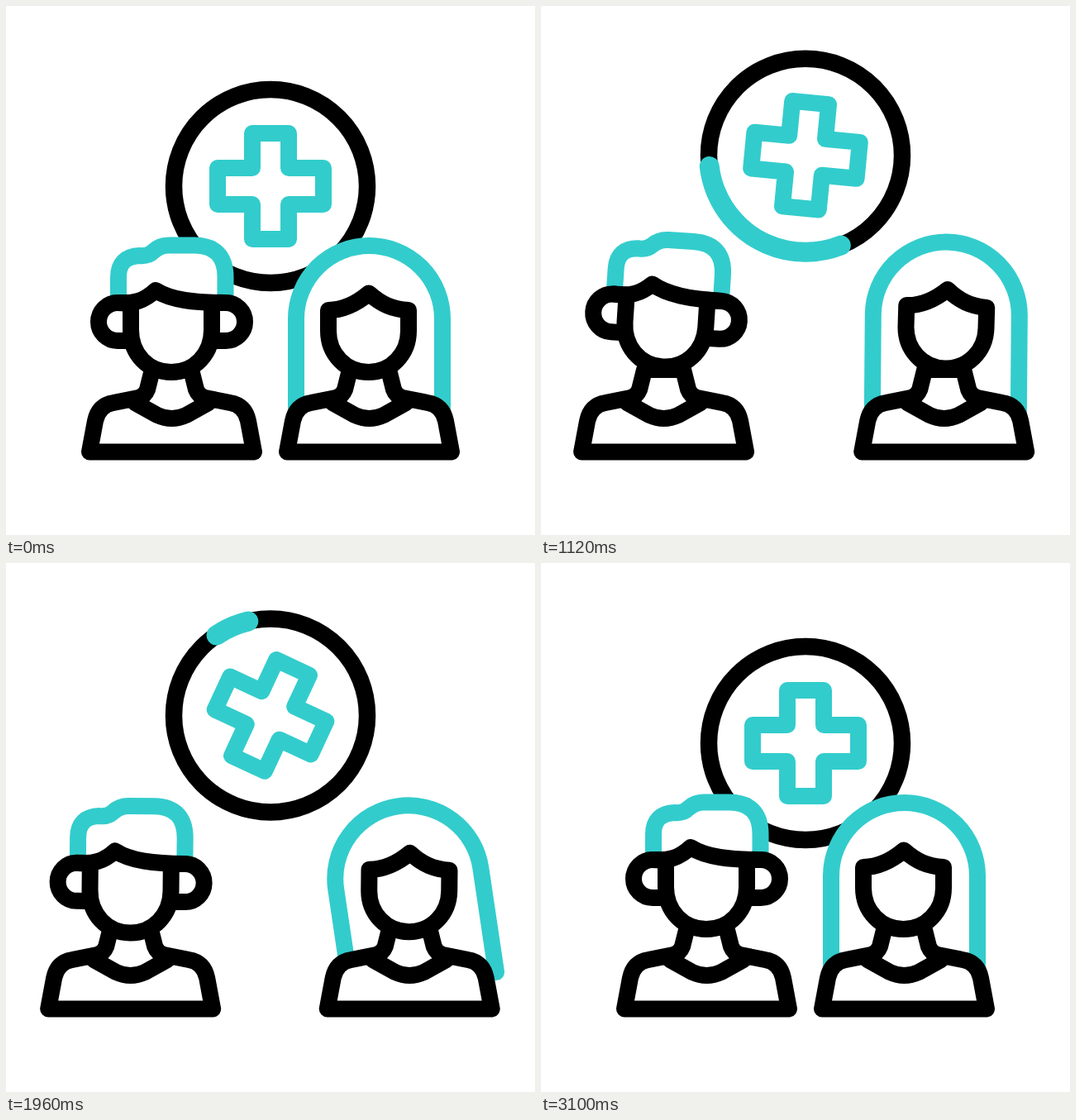
Recreate the animation shown at these times as an HTML page. Size 640x640 px, loop 3.6 s.

```html
<!DOCTYPE html>
<html>
<head>
<meta charset="utf-8">
<style>
html, body { margin: 0; width: 100%; height: 100%; overflow: hidden; background: #fff; }
svg { display: block; width: 100vw; height: 100vh; }
.k { stroke: #000; }
.c { stroke: #3cc; }
</style>
</head>
<body>
<svg viewBox="0 0 640 640" fill="none" stroke-width="20" stroke-linejoin="round" stroke-linecap="round">
  <defs>
    <g id="bust" class="k">
      <path fill="#fff" d="M101 539.5L108 502Q112 483 130 480L160 474Q168 472 171 464L177 440H224L230 464Q233 472 241 474L271 480Q289 483 293 502L300 539.5Z"/>
      <path d="M156 480L183 495Q200.500 503 218 495L245 480"/>
    </g>
  </defs>
  <g id="badge">
    <circle class="k" cx="320" cy="218" r="117" stroke-width="20.500"/>
    <circle id="arc" class="c" cx="320" cy="218" r="117" stroke-width="24" pathLength="360"/>
    <path id="cross" class="c" d="M298 154h44v42h42v44h-42v42h-44v-42h-42v-44h42z"/>
  </g>
  <g id="man">
    <use href="#bust"/>
    <g id="manHead">
      <path class="c" fill="#fff" stroke-linecap="butt" d="M136 356V328Q136 303 162 302Q172 303 178 297Q186 289.500 197 289.500H228Q265.500 290 265.500 328V356"/>
      <g class="k" fill="#fff">
        <path d="M151 359H135a23 23 0 0 0 0 46H151M249 359H266a23 23 0 0 1 0 46H249"/>
        <path d="M151 360V392C151 421 172 443 200 443S249 421 249 392V360"/>
        <path fill="none" d="M135 359C155 361 168 356 181 344C200 356 228 359 266 359"/>
      </g>
    </g>
  </g>
  <g id="woman">
    <path id="hair" class="c" fill="#fff" d="M351 506V378.500a88.500 88.500 0 0 1 177 0V506"/>
    <use href="#bust" x="239"/>
    <path id="face" class="k" fill="#fff" d="M439 347.500C423 361 408 368 390 368V393C390 421 411 443 438.500 443S487 421 487 393V368C468 367 454 361 439 347.500Z"/>
  </g>
</svg>
<script>
const LOOP = 3600, TRAVEL = 1400;
const $ = id => document.getElementById(id);
const clamp = u => Math.min(1, Math.max(0, u));
const smooth = u => u * u * (3 - 2 * u);

// Quick start, long settle: cubic-bezier(.335, 0, .23, 1)
function settle(u) {
  u = clamp(u);
  let lo = 0, hi = 1;
  for (let i = 0; i < 24; i++) {
    const s = (lo + hi) / 2, r = 1 - s;
    const x = 3 * r * r * s * .335 + 3 * r * s * s * .23 + s * s * s;
    if (x < u) lo = s; else hi = s;
  }
  return smooth(lo);
}

// Out from start, back home at end
const trip = (t, start, end) =>
  Math.min(settle((t - start) / TRAVEL), settle((end - t) / TRAVEL));

// Symmetric power easing
function swing(u) {
  u = clamp(u);
  return u < .5 ? .5 * (2 * u) ** 2.3 : 1 - .5 * (2 - 2 * u) ** 2.3;
}

// Smooth interpolation through [time, value] keys
function track(t, keys) {
  for (let i = 1; i < keys.length; i++) {
    const [t0, a] = keys[i - 1], [t1, b] = keys[i];
    if (t < t1) return a + (b - a) * smooth(clamp((t - t0) / (t1 - t0)));
  }
  return keys[keys.length - 1][1];
}

const POSES = [0, 480, 1120, 1640, 2280, 2660, 3080];
const poses = (...values) => POSES.map((t, i) => [t, values[i]]);

const manTilt = poses(0, -6.5, 3.7, -1.5, 2.6, .5, 0);
const manDrop = poses(0, 14, -6.5, 10, -1, 0, 0);
const faceTilt = poses(0, -5, 1.7, 1.5, -.3, 2, 0);
const womanDrop = poses(0, 11, -4.5, 4, 2.5, .5, 0);
const womanSway = poses(0, -1.5, 2.5, 0, .5, 1, 0);
const hairTilt = [[150, 0], [820, -14], [1380, 12], [2050, -9.5], [2640, 5.3], [3080, 0]];
const spin = [[0, 0], [680, -16], [1950, 385], [2610, 360]];

const place = (id, x, y, angle = 0, px = 0, py = 0) =>
  $(id).setAttribute('transform', `translate(${x} ${y}) rotate(${angle} ${px} ${py})`);

function draw(t) {
  place('badge', 0, -38.3 * trip(t, 0, 2808));
  place('cross', 0, 0, track(t, spin), 320, 218);

  const head = 720 * swing((t - 422) / 1568);
  const tail = 720 * swing((t - 503) / 1706);
  const length = head - tail;
  const arc = $('arc');
  arc.style.display = length > .2 ? '' : 'none';
  arc.setAttribute('stroke-dasharray', `${length} 360`);
  place('arc', 0, 0, 257 + tail, 320, 218);

  place('man', -53.3 * trip(t, 0, 2940), 0);
  place('manHead', 0, track(t, manDrop), track(t, manTilt), 200, 428);

  place('woman', 50.5 * trip(t, 80, 3040), 0);
  const sway = track(t, womanSway), drop = track(t, womanDrop);
  place('hair', sway, drop, track(t, hairTilt), 439.5, 390);
  place('face', sway, drop, track(t, faceTilt), 439, 420);
}

const origin = performance.now();
function frame() {
  draw((performance.now() - origin) % LOOP);
  requestAnimationFrame(frame);
}
frame();
</script>
</body>
</html>
```
